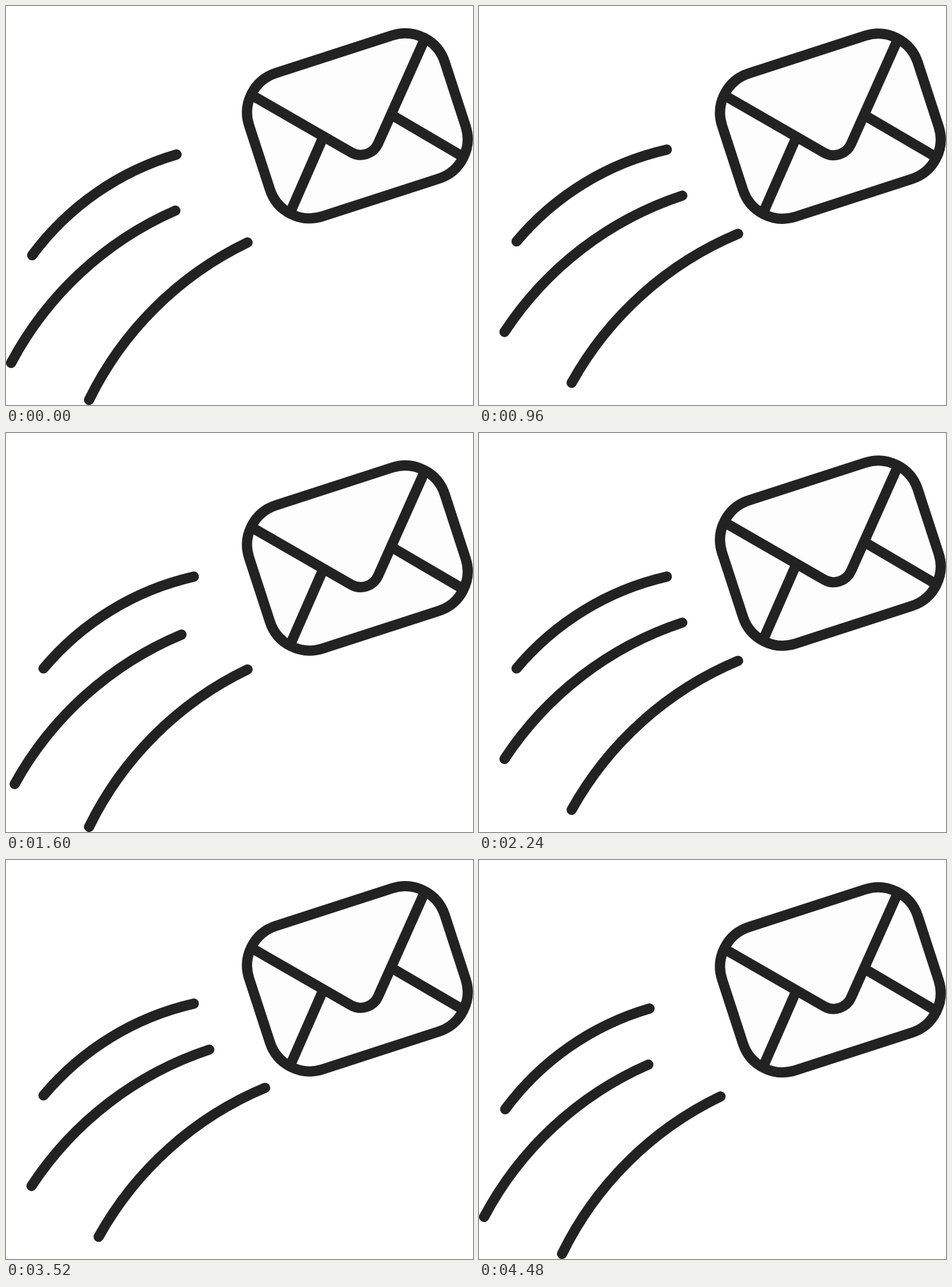
An HTML page with a canvas that plays this animation: 731 by 626 pixels, repeating every 5.04 s.

```html
<!DOCTYPE html>
<html lang="en">
<head>
<meta charset="utf-8">
<title>Flying envelope</title>
<style>
  html, body { margin: 0; width: 100%; height: 100%; overflow: hidden; background: #fff; }
  canvas { display: block; }
</style>
</head>
<body>
<canvas id="stage" width="731" height="626"></canvas>
<script>
const ctx = document.getElementById('stage').getContext('2d');
const LOOP = 5040, STEP = 64, LAST = 70;
const SWING = 10; // steps per half swing
const INK = '#222', PAPER = '#fdfdfd';

// Vertical offset of the envelope at the end of each half swing
const bounce = [0, -35.6, 36.7, -20.3, 21.3, -10.3, 7, 0];

// Speed lines: resting ends, radius of the curve, radius of the orbit it
// swings on, distance travelled, delay in steps
const trails = [
  { tail: [41, 391], head: [267, 233], r: 432, orbit: 460, travel: 56, delay: 0 },
  { tail: [8, 560], head: [265, 321], r: 533, orbit: 620, travel: 69, delay: 2.5 },
  { tail: [130, 618], head: [378, 371], r: 533, orbit: 590, travel: 30.7, delay: 5 }
].map(toArc);

function toArc({ tail: [x1, y1], head: [x2, y2], r, orbit, travel, delay }) {
  const dx = x2 - x1, dy = y2 - y1, len = Math.hypot(dx, dy);
  const centre = radius => {
    const depth = Math.sqrt(radius * radius - len * len / 4) / len;
    return [(x1 + x2) / 2 - dy * depth, (y1 + y2) / 2 + dx * depth];
  };
  const [cx, cy] = centre(r);
  return {
    cx, cy, r, delay,
    pivot: centre(orbit),
    turn: travel / orbit,
    from: Math.atan2(y1 - cy, x1 - cx),
    to: Math.atan2(y2 - cy, x2 - cx)
  };
}

const ease = p => p * p * (3 - 2 * p);

function envelopeY(step) {
  const i = Math.min(Math.floor(step / SWING), bounce.length - 2);
  return bounce[i] + (bounce[i + 1] - bounce[i]) * ease(step / SWING - i);
}

// Three swings forward and back, then rest
function swing(step) {
  const s = Math.max(0, Math.min(step, 6 * SWING)) / SWING % 2;
  return ease(s > 1 ? 2 - s : s);
}

function drawTrail({ cx, cy, r, from, to, pivot: [px, py], turn, delay }, step) {
  ctx.save();
  ctx.translate(px, py);
  ctx.rotate(turn * swing(step - delay));
  ctx.beginPath();
  ctx.arc(cx - px, cy - py, r, from, to);
  ctx.stroke();
  ctx.restore();
}

function drawEnvelope(y) {
  ctx.save();
  ctx.translate(550, 188 + y);
  ctx.rotate(-Math.PI / 10);
  ctx.beginPath();
  ctx.roundRect(-161, -118.2, 322, 236.4, 65.4);
  ctx.fill();
  ctx.stroke();
  ctx.lineCap = 'butt';
  ctx.beginPath();
  ctx.moveTo(-140.5, -94.8);
  ctx.arcTo(0, 61.2, 140.5, -94.8, 30);
  ctx.lineTo(140.5, -94.8);
  for (const side of [-1, 1]) {
    ctx.moveTo(side * 56, 0);
    ctx.lineTo(side * 139.5, 94);
  }
  ctx.stroke();
  ctx.restore();
}

function draw(time) {
  const step = Math.min(Math.floor(time % LOOP / STEP), LAST);
  ctx.clearRect(0, 0, 731, 626);
  ctx.strokeStyle = INK;
  ctx.fillStyle = PAPER;
  ctx.lineWidth = 16;
  ctx.lineCap = 'round';
  for (const trail of trails) drawTrail(trail, step);
  drawEnvelope(envelopeY(step));
}

const start = performance.now();
function tick() {
  draw(performance.now() - start);
  requestAnimationFrame(tick);
}
tick();
</script>
</body>
</html>
```
